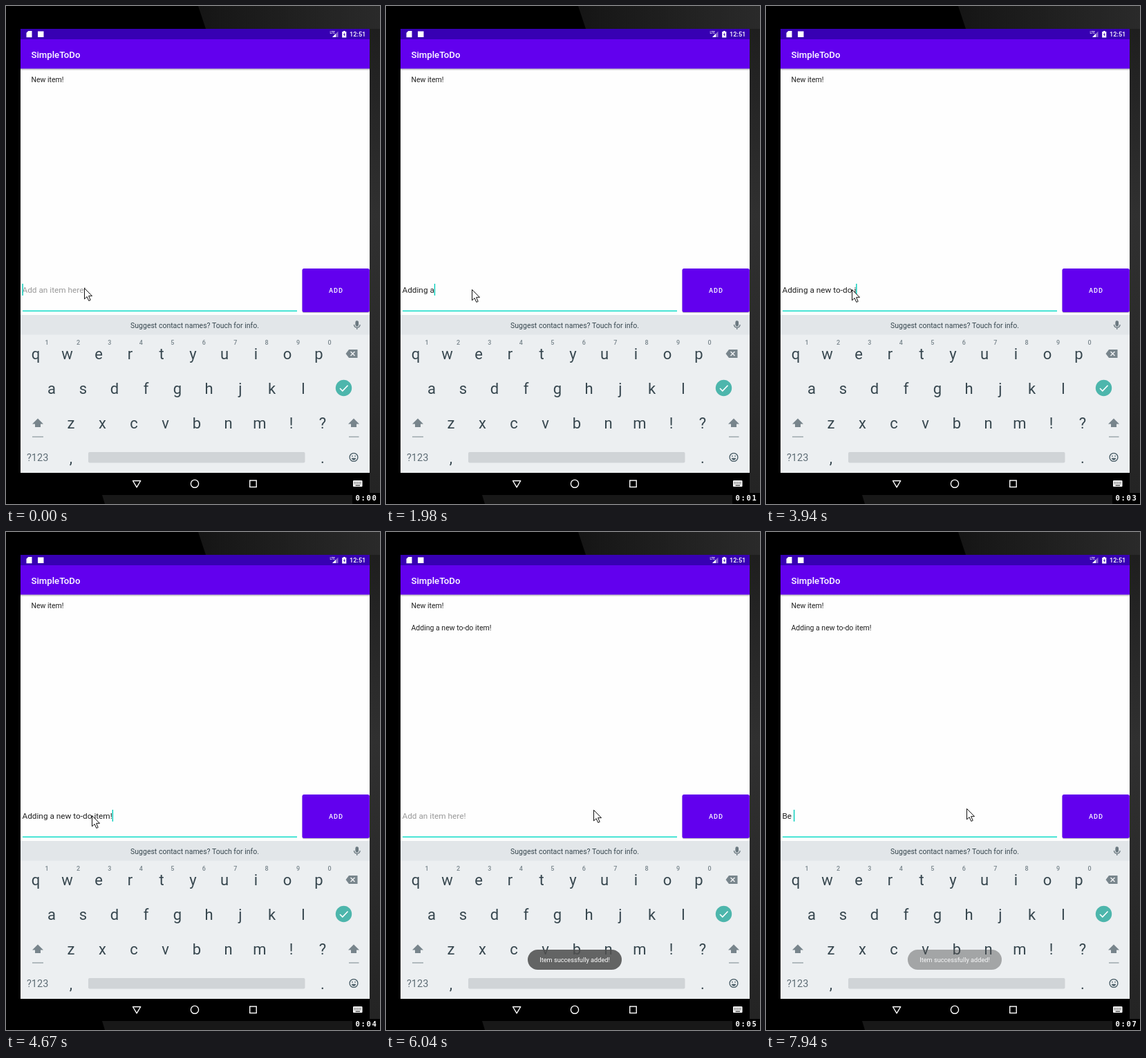
Write an HTML page that moves like this. It is 541x719 px and loops after 8 s.

```html
<!DOCTYPE html>
<html lang="en">
<head>
<meta charset="utf-8">
<title>To-do list</title>
<style>
html, body { margin: 0; width: 100%; height: 100%; overflow: hidden; background: #000; }
svg { display: block; }
text { font-family: Roboto, sans-serif; white-space: pre; }
.mid { text-anchor: middle; }
.key { font-size: 22px; fill: #37474f; }
.digit { font-size: 9px; font-weight: 500; fill: #77848b; }
.edit { font-size: 11.8px; }
.item { font-size: 10.5px; fill: #212121; }
.side { font-size: 14px; fill: #87929a; }
.clock { font: bold 10.5px "DejaVu Sans Mono", monospace; letter-spacing: 1.7px; fill: #fff; }
</style>
</head>
<body>
<svg width="541" height="719" viewBox="0 0 541 719">
  <defs>
    <linearGradient id="desk" x2="1" y2="0">
      <stop offset="0" stop-color="#151515"/><stop offset="1" stop-color="#2a2a2a"/>
    </linearGradient>
    <linearGradient id="wall" x2="0" y2="1">
      <stop offset="0" stop-color="#1e1e1e"/><stop offset=".4" stop-color="#303030"/><stop offset="1" stop-color="#242424"/>
    </linearGradient>
    <linearGradient id="shade" x2="0" y2="1">
      <stop offset="0" stop-color="#000" stop-opacity=".28"/><stop offset="1" stop-color="#000" stop-opacity="0"/>
    </linearGradient>
    <clipPath id="face"><rect x="428.5" y="379" width="97.3" height="63" rx="2.5"/></clipPath>
    <path id="shift" d="M0-6.5 8 1.5H4V6H-4V1.5H-8Z" fill="#78858c"/>
  </defs>

  <!-- desktop -->
  <rect width="541" height="719"/>
  <path d="M278 0H541V33H289Z" fill="url(#desk)"/>
  <rect x="526" y="33" width="15" height="673" fill="url(#wall)"/>
  <path d="M139 706H541V719H143Z" fill="#181818"/>

  <!-- app -->
  <rect x="21" y="33" width="505" height="641" fill="#fefefe"/>
  <rect x="21" y="33" width="505" height="15.5" fill="#3700b3"/>
  <rect x="21" y="48" width="505" height="42.5" fill="#6200ee"/>
  <rect x="21" y="90.5" width="505" height="3" fill="url(#shade)"/>
  <g fill="#fff">
    <path d="M32.3 36H37.5V45.3H29.5V38.8Z"/>
    <rect x="46" y="36.5" width="8.5" height="8.5"/>
    <text x="468.5" y="39.8" font-size="4.6" font-weight="500">LTE</text>
    <path d="M480.5 36.5V45H472Z" opacity=".4"/><path d="M477 40V45H472Z"/>
    <path d="M488 36H490.5V37H492.3V45.5H486.2V37H488Z"/>
    <text x="497" y="44.3" font-size="9.2" font-weight="500">12:51</text>
    <text x="36.5" y="74.5" font-size="13.2" font-weight="500">SimpleToDo</text>
  </g>
  <path d="M489.8 38.3 488 41.7H489.2V44L490.8 40.9H489.8Z" fill="#3700b3"/>
  <text class="item" x="36.5" y="110">New item!</text>
  <text class="item" id="added" x="36.5" y="141.6">Adding a new to-do item!</text>

  <!-- entry row -->
  <text class="edit" x="23.5" y="414" id="hint" fill="#999">Add an item here!</text>
  <text class="edit" x="23.5" y="414" id="entry" fill="#212121"></text>
  <rect id="caret" y="401" width="1.4" height="17" fill="#03cdbb"/>
  <rect x="24" y="439.6" width="397" height="1.4" fill="#03dac5"/>
  <rect id="lift" x="430" y="381" width="96" height="64.5" rx="3" fill="#000"/>
  <rect x="428.5" y="380" width="97.3" height="63" rx="2.5" fill="#bbb"/>
  <g clip-path="url(#face)">
    <rect x="428" y="379" width="98" height="63" fill="#6200ee"/>
    <text x="467" y="414" font-size="9.2" font-weight="500" letter-spacing="1" fill="#fff">ADD</text>
    <rect id="press" x="428" y="379" width="98" height="63" fill="#fff"/>
    <circle id="ripple" cx="466" cy="400" fill="#fff"/>
  </g>

  <!-- keyboard -->
  <rect x="21" y="446" width="505" height="29" fill="#e2e6e9"/>
  <rect x="21" y="474.5" width="505" height="199.5" fill="#eceff1"/>
  <text class="mid" id="prompt" x="273" y="465" font-size="10.5" fill="#37474f">Suggest contact names? Touch for info.</text>
  <g id="words">
    <text class="mid side" x="146" y="466.3"></text>
    <text class="mid" x="273" y="466.3" font-size="14" font-weight="700" fill="#455a64"></text>
    <text class="mid side" x="400" y="466.3"></text>
    <path d="M206 453V468M340.500 453V468" stroke="#cdd3d6"/>
    <path d="M267.500 472.500H270M271.800 472.500H274.300M276 472.500H278.500" stroke="#455a64" stroke-width="2"/>
  </g>
  <g fill="none" stroke="#6b7980" stroke-width="1.300">
    <rect x="506" y="455" width="3.400" height="7" rx="1.700" fill="#6b7980"/>
    <path d="M503.500 460C503.500 465.500 512 465.500 512 460M507.700 464V467"/>
  </g>
  <g id="keys"></g>
  <path d="M491.500 502 496 496H508.500V508H496Z" fill="#78858c"/>
  <path d="M498.500 499 504.500 505M504.500 499 498.500 505" stroke="#eceff1" stroke-width="1.500"/>
  <circle cx="488.500" cy="551.500" r="11.700" fill="#4db6ac"/>
  <path d="M483 552 486.800 555.800 494.500 547.800" fill="none" stroke="#fff" stroke-width="1.600"/>
  <use href="#shift" x="46" y="602"/><use href="#shift" x="503" y="602"/>
  <path d="M38 622H54M496 622H510.500" stroke="#78858c" stroke-width="1.200"/>
  <text x="30" y="656.500" font-size="14.500" fill="#5f6e76">?123</text>
  <text class="mid key" x="94" y="660">,</text>
  <text class="mid key" x="458" y="660">.</text>
  <rect x="119" y="644" width="313.500" height="15.500" rx="2" fill="#d0d4d7"/>
  <g fill="none" stroke="#455a64" stroke-width="1.300">
    <circle cx="503" cy="651.500" r="5.900"/>
    <path d="M500 653C501 656 505 656 506 653Z" fill="#455a64" stroke-width=".6"/>
    <path d="M500.200 649.700H501.700M504.300 649.700H505.800" stroke-width="1.600"/>
  </g>

  <!-- toast -->
  <g id="toast">
    <rect x="205" y="603" width="136" height="29" rx="14.500" fill="#505050" fill-opacity=".87"/>
    <text class="mid" x="273" y="621" font-size="9.200" fill="#fff">Item successfully added!</text>
  </g>

  <!-- navigation bar -->
  <rect x="21" y="674" width="505" height="32"/>
  <g fill="none" stroke="#fff" stroke-width="1.400">
    <path d="M183.500 685.500H194.700L189.100 694.800Z" stroke-linejoin="round"/>
    <circle cx="273" cy="689.700" r="5.600"/>
    <rect x="352.700" y="685" width="9.500" height="9.500"/>
  </g>
  <rect x="502" y="685" width="13.500" height="9" rx="1" fill="#fff"/>
  <path d="M503.500 687.500H514.500M503.500 689.700H514.500" stroke="#000" stroke-width="1.100" stroke-dasharray="1.200 1"/>
  <path d="M505.500 692.200H512" stroke="#000"/>

  <rect x="501" y="703" width="40" height="16"/>
  <text class="clock" id="clock" x="505.500" y="714"></text>
  <path id="mouse" d="M.5.5V16L4.100 12.700 6.800 18.600 9.200 17.500 6.600 11.700H11.500Z" fill="#fff" stroke="#111"/>
</svg>
<script>
const LOOP = 8000;
const $ = id => document.getElementById(id);
const set = (id, attrs) => Object.entries(attrs).forEach(([k, v]) => $(id).setAttribute(k, v));

function keyRow(letters, x, y) {
  return [...letters].map((c, i) =>
    `<text class="mid key" x="${x + i * 45.5}" y="${y}">${c}</text>`).join('');
}
$('keys').innerHTML = keyRow('qwertyuiop', 43, 510) + keyRow('asdfghjkl', 66, 560) +
  keyRow('zxcvbnm!?', 94, 610) + [...'1234567890'].map((c, i) =>
    `<text class="mid digit" x="${59 + i * 45.45}" y="489">${c}</text>`).join('');

// Each step changes part of the state and holds until the next one.
const start = { text: '', caret: 1, mouse: [113, 407], words: '', sec: 0, press: 0, radius: 0, glow: 0, toast: 0, added: 0 };
const steps = [
  [120, { mouse: [120, 408] }],
  [270, { mouse: [124, 409], caret: 0 }],
  [800, { caret: 1 }],
  [920, { text: 'A' }],
  [1030, { words: 'I A And' }],
  [1140, { sec: 1 }],
  [1440, { text: 'Add', words: 'Ads Add Additional' }],
  [1580, { text: 'Adding', words: 'Addition Adding Additional' }],
  [1710, { text: 'Adding ', words: '' }],
  [1980, { text: 'Adding a' }],
  [2100, { words: 'as a and', sec: 2 }],
  [2230, { text: 'Adding a ' }],
  [2360, { words: '' }],
  [2490, { text: 'Adding a n' }],
  [2620, { text: 'Adding a ne', words: 'be ne need' }],
  [2750, { text: 'Adding a new', words: 'news new next' }],
  [2880, { text: 'Adding a new ' }],
  [3010, { words: '' }],
  [3110, { text: 'Adding a new to', sec: 3 }],
  [3260, { text: 'Adding a new to-', words: 'go to two' }],
  [3380, { text: 'Adding a new to-d', words: '' }],
  [3520, { text: 'Adding a new to-do' }],
  [3660, { text: 'Adding a new to-do ' }],
  [3940, { text: 'Adding a new to-do i' }],
  [4050, { text: 'Adding a new to-do it', words: 'in it is', sec: 4 }],
  [4170, { text: 'Adding a new to-do ite' }],
  [4290, { text: 'Adding a new to-do item', words: 'items item times' }],
  [4400, { text: 'Adding a new to-do item!' }],
  [4670, { words: '' }],
  [4950, { caret: 0, mouse: [160, 405] }],
  [5080, { sec: 5, mouse: [300, 397] }],
  [5200, { mouse: [425, 397] }],
  [5350, { mouse: [464, 399], caret: 1 }],
  [5620, { text: '', press: .15, radius: 34, glow: .2 }],
  [5770, { added: 1, radius: 62, glow: .14, toast: .4 }],
  [5900, { press: .05, radius: 90, glow: .05, toast: .85, mouse: [420, 402] }],
  [6040, { press: 0, glow: 0, toast: 1, caret: 0, mouse: [300, 401] }],
  [6160, { sec: 6, caret: 1, mouse: [293, 401] }],
  [6290, { mouse: [291, 400] }],
  [6560, { mouse: [290, 399] }],
  [6710, { caret: 0 }],
  [7110, { sec: 7 }],
  [7360, { caret: 1 }],
  [7670, { text: 'B', words: 'By B But' }],
  [7810, { text: 'Be', words: 'By Be But', toast: .85 }],
  [7940, { text: 'Be ', words: '', toast: .53 }]
];

function draw(t) {
  const s = Object.assign({}, start, ...steps.filter(([at]) => at <= t).map(step => step[1]));
  $('entry').textContent = s.text;
  set('hint', { opacity: s.text ? 0 : 1 });
  set('caret', { x: 23.4 + (s.text ? $('entry').getComputedTextLength() : 0), opacity: s.caret });
  set('added', { opacity: s.added });
  set('press', { opacity: s.press });
  set('lift', { opacity: s.press * 1.4 });
  set('ripple', { r: s.radius, opacity: s.glow });
  set('prompt', { opacity: s.words ? 0 : 1 });
  set('words', { opacity: s.words ? 1 : 0 });
  const words = s.words.split(' ');
  $('words').querySelectorAll('text').forEach((el, i) => el.textContent = words[i] || '');
  set('toast', { opacity: s.toast });
  set('mouse', { transform: `translate(${s.mouse})` });
  $('clock').textContent = `0:0${s.sec}`;
}

const began = performance.now();
function tick() {
  draw((performance.now() - began) % LOOP);
  requestAnimationFrame(tick);
}
tick();
</script>
</body>
</html>
```
